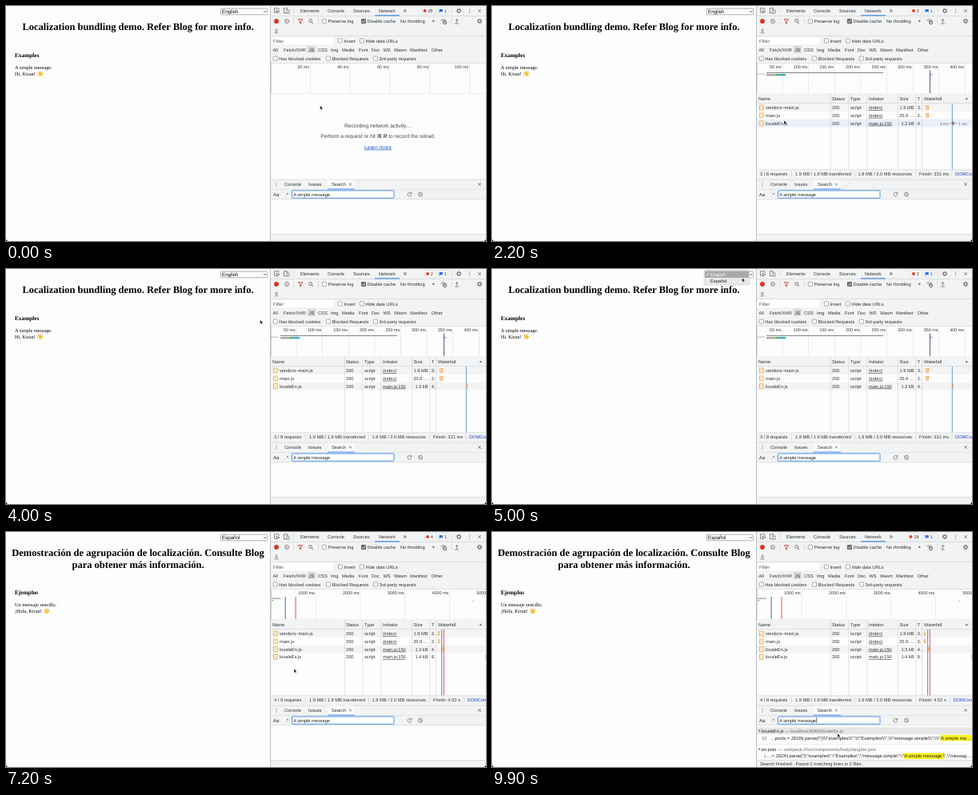
An HTML page that plays this animation: 600x294 px, repeating every 10 s.

```html
<!DOCTYPE html>
<html lang="en">
<head>
<meta charset="utf-8">
<title>Localization bundling demo</title>
<style>
html, body { margin: 0; width: 100%; height: 100%; overflow: hidden; background: #fdfdfd; }
svg { display: block; width: 600px; height: 294px; text-rendering: geometricPrecision;
  font-family: "Liberation Sans", "DejaVu Sans", sans-serif; }
.serif { font-family: "Liberation Serif", serif; }
</style>
</head>
<body>
<svg id="stage" viewBox="0 0 600 294"></svg>
<script>
const stage = document.getElementById('stage');
const BAR = '#f1f3f4', EDGE = '#cdd0d4', INK = '#333', GREY = '#6e6e6e', BLUE = '#1a73e8', ORANGE = '#f2a33a';

// drawing helpers, each returns markup
const text = (x, y, s, size = 5.7, fill = INK, more = '') =>
  `<text x="${x}" y="${y}" font-size="${size}" fill="${fill}" ${more}>${s}</text>`;
const END = 'text-anchor="end"', MID = 'text-anchor="middle"';
const rect = (x, y, w, h, fill, more = '') =>
  `<rect x="${x}" y="${y}" width="${w}" height="${h}" fill="${fill}" ${more}/>`;
const hline = (y, x = 331, w = 269, fill = EDGE) => rect(x, y, w, .6, fill);
const vline = (x, y, h, fill = EDGE, w = .6) => rect(x, y, w, h, fill);
const path = (d, stroke = GREY, w = .8, fill = 'none') =>
  `<path d="${d}" stroke="${stroke}" stroke-width="${w}" fill="${fill}"/>`;
const dot = (x, y, r, fill, more = '') => `<circle cx="${x}" cy="${y}" r="${r}" fill="${fill}" ${more}/>`;
const ring = (x, y, r, w = .8, color = GREY) => dot(x, y, r, 'none', `stroke="${color}" stroke-width="${w}"`);
const cross = (x, y, r = 1.8) => path(`M${x - r} ${y - r}l${2 * r} ${2 * r}m0 ${-2 * r}l${-2 * r} ${2 * r}`);
const dots = (x, y) => [-2, 0, 2].map(d => dot(x, y + d, .6, GREY)).join('');
const gear = (x, y) => ring(x, y, 1.9, 1.1) +
  `<circle cx="${x}" cy="${y}" r="2.8" fill="none" stroke="${GREY}" stroke-width=".8" stroke-dasharray="1.1 1.1"/>`;
const ban = (x, y) => ring(x, y, 2.5) + path(`M${x - 1.7} ${y - 1.7}l3.4 3.4`);
const box = (x, y, label) => rect(x + .3, y - 2.6, 5.2, 5.2, '#fff', 'rx="1" stroke="#777" stroke-width=".6"') +
  text(x + 7.4, y + 2.1, label);

// cursor stops: time, x, y
const stops = [
  [0, 392.5, 124.5], [1400, 392.5, 124.5], [1900, 365, 143], [2300, 365, 143], [2900, 36, 78],
  [3300, 28, 88], [4000, 317.5, 63.5], [4500, 316, 6], [4700, 316, 6], [5000, 312.5, 11], [5200, 302, 15],
  [5500, 302, 15], [6200, 366, 153], [6400, 366, 153], [6800, 362, 126], [7200, 360, 171], [7400, 398, 230],
  [7700, 412, 235], [8500, 412, 235], [9200, 540, 278], [9500, 540, 278], [9800, 432, 252]
];
function pointer(t) {
  const i = stops.findIndex(s => s[0] > t);
  if (i < 0) return stops[stops.length - 1].slice(1);
  const [t0, x0, y0] = stops[i - 1], [t1, x1, y1] = stops[i];
  const k = (t - t0) / (t1 - t0), e = k * k * (3 - 2 * k);
  return [x0 + (x1 - x0) * e, y0 + (y1 - y0) * e];
}

function wave(x, y) {
  return `<g transform="translate(${x} ${y}) rotate(-25)">` +
    path('M-1.8-.5V-2.6M-.5-.8V-3.4M.8-.8V-3.2M2-.2V-2.3', '#f8c33c', 1) +
    rect(-2.3, -1.2, 4.8, 4.2, '#f8c33c', 'rx="1.8"') + path('M2 2L3.6 .2', '#efb02f', 1) + '</g>' +
    path(`M${x - 3.6} ${y + 1}q.2 1.6 1.4 2.2M${x + 2} ${y - 3.6}q1.2 .3 1.6 1.4`, '#7fb4d8', .5);
}

function page(es) {
  const dy = es ? 14.4 : 0;
  const title = es
    ? ['Demostración de agrupación de localización. Consulte Blog', 'para obtener más información.']
    : ['Localization bundling demo. Refer Blog for more info.'];
  return '<g class="serif">' +
    title.map((s, i) => text(165, 30.3 + i * 14.4, s, 12.5, '#000', MID + ' font-weight="700"')).join('') +
    text(11, 63.7 + dy, es ? 'Ejemplos' : 'Examples', 7.3, '#000', 'font-weight="700"') +
    text(11, 78.7 + dy, es ? 'Un mensaje sencillo.' : 'A simple message.', 6.25, '#000') +
    text(11, 86.9 + dy, es ? '¡Hola, Kiran!' : 'Hi, Kiran!', 6.25, '#000') + '</g>' +
    wave(es ? 50.5 : 42.7, 84.7 + dy);
}

function picker(es, open, y) {
  let s = rect(268.3, 3.2, 58.4, 7.6, '#fff', 'rx="1" stroke="#777" stroke-width=".6"') +
    text(270, 9.1, es ? 'Español' : 'English', 6.2, '#000') + path('M322.3 6.2l1.4 1.5 1.4-1.5', '#222', .8);
  if (open) {
    const on = y > 11.5 ? 1 : 0, ink = i => i === on ? '#fff' : '#222';
    s += rect(265, 1.2, 57, 18.8, '#e9e9e9', 'rx="2" stroke="#c4c4c4" stroke-width=".5"') +
      rect(266, 2.6 + on * 8.3, 55, 8.3, '#a9a9a9', 'rx="1"') +
      path('M268 6.8l1.2 1.5 1.9-3.4', ink(0), .7) +
      text(273, 9.1, 'English', 5.7, ink(0)) + text(273, 17.3, 'Español', 5.7, ink(1));
  }
  return s;
}

function toolbar(errors) {
  const wide = errors > 9;
  const types = [[333.5, 'All'], [347, 'Fetch/XHR'], [378.7, 'JS'], [390, 'CSS'], [406, 'Img'], [420, 'Media'],
    [441, 'Font'], [457, 'Doc'], [471.5, 'WS'], [485, 'Wasm'], [505, 'Manifest'], [531.5, 'Other']];
  const tabs = [[368, 'Elements'], [402, 'Console'], [434, 'Sources'], [466, 'Network']];
  const chipX = wide ? 520 : 523.5;
  return rect(331, 0, 269, 71, BAR) + hline(12) + hline(37.2) + rect(461, 11.4, 31, 1, BLUE) +
    path('M339 8.3h-3.5v-5.5h5.5v2M338 5l1 4 1-1.5 2-.5z') +
    rect(347.5, 2.8, 4, 6, 'none', `stroke="${GREY}" stroke-width=".8"`) + rect(351, 5, 3, 4, BAR, `stroke="${GREY}" stroke-width=".7"`) +
    vline(359, 2, 8) + tabs.map(([x, s]) => text(x, 8.1, s)).join('') + text(496.5, 8.2, '»', 8) +
    rect(chipX, 2, 537 - chipX, 8.2, '#fafafa', `rx="1" stroke="${EDGE}" stroke-width=".5"`) +
    dot(chipX + 3.5, 6.1, 2, '#db3b30') + text(chipX + 7.2, 8.1, errors) +
    rect(540, 2, 12.5, 8.2, '#fafafa', `rx="1" stroke="${EDGE}" stroke-width=".5"`) +
    path('M541.6 4h4.2v3.3h-2.8l-1.4 1.4z', 'none', 0, BLUE) + text(547.7, 8.1, '1') +
    vline(557, 2, 8) + gear(566, 6) + dots(579.5, 6) + cross(592, 6) +
    dot(338, 19, 2.9, '#d93025') + ban(351, 19) + vline(359.5, 15, 8) +
    path('M365.3 16.6h5.4l-2.1 2.6v2.6h-1.2v-2.6z', '#d93025', .8) +
    ring(380.6, 18.4, 1.9, .9) + path('M382 20l2 2', GREY, 1) + vline(390.5, 15, 8) +
    box(395, 19, 'Preserve log') + box(444, 19, 'Disable cache') +
    rect(444, 16.1, 6, 5.8, '#6b6b6b', 'rx="1"') + path('M445.4 19l1.3 1.5 2.2-3', '#fff', .8) +
    text(493, 21.1, 'No throttling') + path('M532.6 18h3.4l-1.7 2.4z', 'none', 0, GREY) +
    path('M543.4 17.8q3.2-2.6 6.4 0M544.8 19.3q1.8-1.4 3.6 0') + gear(548.6, 20.8).replaceAll('r="2.8"', 'r="1.6"') +
    vline(556.5, 15, 8) + path('M563.5 21v-4.6m-1.8 1.8l1.8-1.8 1.8 1.8M561 22h5') + gear(592, 19) +
    path('M338 28v4m-1.8-1.6l1.8 1.8 1.8-1.8M335.5 33.7h5') +
    rect(331.5, 38.5, 77.5, 9.7, '#fff') + text(334, 45.7, 'Filter', 5.9, '#555') +
    box(415, 43.4, 'Invert') + box(442, 43.4, 'Hide data URLs') +
    rect(376.8, 50, 10, 8.8, '#d4d6d9', 'rx="1"') + types.map(([x, s]) => text(x, 56.7, s)).join('') +
    box(333.8, 65.6, 'Has blocked cookies') + box(400, 65.6, 'Blocked Requests') + box(459, 65.6, '3rd-party requests');
}

function overview(mode) {
  const [first, gap, unit] = [[380, 49.8, 20], [362.8, 32.6, 50], [386.8, 55.8, 1000]][mode];
  let s = rect(331, 71, 269, 38, '#fdfdfd') + hline(71);
  for (let x = first, n = 1; x < 620; x += gap, n++)
    s += vline(x, 72, 37, '#dedede') + text(x - 1, 78.2, n * unit + ' ms', 5.4, INK, END);
  s += vline(330.7, 71, 38, '#777', .6);
  if (mode === 1)
    s += hline(84.8, 331, 10, '#888') + rect(343, 82.9, 146, 1.1, '#8a8a8a') + rect(343, 85, 13, 2.4, '#a8a8a8') +
      rect(355, 84.9, 5, 2.4, '#52b36a') + rect(360, 84.9, 7, 2.4, '#43a7c4') +
      vline(547, 80.5, 28.5, '#45506e', .9) + rect(548, 85.2, 2.5, 1.2, '#6da9c9');
  if (mode === 2)
    s += rect(332, 82.6, 11, 1, '#8a8a8a') + rect(332, 85, 2, 1.2, '#52b36a') +
      vline(348.7, 81, 28, '#37568f', .9) + vline(361.6, 81, 28, '#cf4a42', .9) + rect(583.5, 85.5, 1.4, 1.1, '#7fb0d8');
  return s + hline(109);
}

function idle() {
  return rect(331, 109.6, 269, 107, '#fdfdfd') +
    text(465, 152, 'Recording network activity…', 6.65, '#444', MID) +
    text(465, 165, 'Perform a request or hit <tspan font-weight="700">⌘ R</tspan> to record the reload.', 6.55, '#444', MID) +
    text(465, 178.6, 'Learn more', 6.65, '#1558d6', MID + ' text-decoration="underline"');
}

function table(es, x, y) {
  const cols = [[333, 'Name'], [425, 'Status'], [448, 'Type'], [471, 'Initiator'], [509.5, 'Size'], [531.7, 'T'], [540, 'Waterfall']];
  const rows = [['vendors~main.js', '(index)', '1.9 MB', '3.'], ['main.js', '(index)', '25.9 …', '2.'],
    ['localeEn.js', 'main.js:150', '1.3 kB', '4.'], ['localeEs.js', 'main.js:150', '1.4 kB', '8.']];
  const hover = x > 331 && y > 122 ? Math.floor((y - 122) / 9.8) : -1;
  let s = rect(331, 109.6, 269, 95, '#fdfdfd') + rect(331, 109.6, 269, 12, BAR) + hline(121.4);
  const list = rows.slice(0, es ? 4 : 3);
  list.forEach((r, i) => {
    const top = 122 + i * 9.8;
    if (hover === i || i % 2 === 0) s += rect(331, top, 269, 9.8, hover === i ? '#e9f0fb' : '#f4f4f4');
  });
  for (const cx of [423, 445.6, 468.6, 507.4, 529.6, 537.3]) s += vline(cx, 110, 95);
  s += cols.map(([cx, name]) => text(cx, 117.7, name)).join('') + path('M591.6 117l1.7-2.6 1.7 2.6z', 'none', 0, GREY);
  const marks = es ? [[544.2, '#4a7fd0'], [546.8, '#d2443c']] : [[574.8, '#4a8fdb']];
  s += marks.map(([mx, c]) => vline(mx, 122, 83, c, .9)).join('');
  list.forEach(([name, from, size, time], i) => {
    const top = 122 + i * 9.8, base = top + 7;
    s += rect(334.6, top + 2.2, 4.6, 5.6, '#fff6e4', `stroke="${ORANGE}" stroke-width=".8"`) +
      path(`M335.8 ${top + 5.6}l1-1.2 1 1.2`, ORANGE, .7) +
      text(342, base, name) + text(425, base, '200') + text(448, base, 'script') +
      text(471, base, from, 5.6, INK, 'text-decoration="underline"') + text(527.5, base, size, 5.7, INK, END) +
      text(531.8, base, time);
    const bar = es ? [540, 540, 545, 599][i] : [542, 542, 575.6][i], w = es ? 1.8 : i < 2 ? 4 : 1.6;
    s += rect(bar, top + 2, w, 5.8, '#f6b26b');
    if (!es && i < 2) s += rect(bar + 1.2, top + 2.6, 1, 4.6, '#fdf1e0');
    if (hover === i && !es && i === 2)
      s += text(570.5, base, '3 ms', 5, GREY, END) + hline(top + 5, 571.5, 10, '#777') +
        rect(575, top + 3.4, 2.4, 3.4, '#9a6a50') + text(583, base, '1 ms', 5, GREY);
    if (hover === i && i === 3) s += text(594.5, base, '6 ms', 5, GREY, END) + hline(top + 5, 595.5, 4.5, '#777');
  });
  const facts = [[335, es ? '4 / 9 requests' : '3 / 8 requests'], [379, '1.9 MB / 1.9 MB transferred'],
    [457.6, '1.9 MB / 2.0 MB resources'], [534, es ? 'Finish: 4.52 s' : 'Finish: 331 ms']];
  return s + rect(331, 204.6, 269, 12.4, BAR) + hline(204.6) + facts.map(([fx, f]) => text(fx, 212.2, f)).join('') +
    [374, 453, 529.5, es ? 572.5 : 574.5].map(fx => vline(fx, 206.5, 8)).join('') +
    text(es ? 576.5 : 579, 212.2, 'DOMContentLoaded', 5.7, '#1a3fc4');
}

function results(x, y) {
  const raw = String.raw;
  const long = raw`…ports = JSON.parse(\"{\\\"examples\\\":\\\"Examples\\\",\\\"message.simple\\\":\\\"`;
  const short = raw`…= JSON.parse("{\"examples\":\"Examples\",\"message.simple\":\"`;
  const tops = [244.4, 253.2, 267.4, 276];
  const hover = tops.findIndex(top => y >= top && y < top + 8.8);
  const head = (i, name, gap, place) => path(`M332.8 ${tops[i] + 3.4}h3l-1.5 2.4z`, 'none', 0, GREY) +
    text(337, tops[i] + 6.5, name, 5.7, '#222') + text(gap, tops[i] + 6.5, '— ' + place, 5.7, GREY);
  return (hover >= 0 ? rect(331, tops[hover], 269, 8.7, '#e6e6e6') : '') +
    head(0, 'localeEn.js', 366, 'localhost:8080/localeEn.js') + text(343.5, 259.7, '10', 5.7, GREY, END) +
    rect(560.6, 253.8, 39.4, 7.6, '#fdf31c') + text(560.6, 259.7, long, 5.88, '#222', END) +
    text(561, 259.7, 'A simple me…', 5.88, '#222') + hline(265.3, 331, 269, '#e2e2e2') +
    head(2, 'en.json', 358, 'webpack:///src/components/body/lang/en.json') + text(343, 282.4, '1', 5.7, GREY, END) +
    rect(515, 276.5, 50.3, 7.6, '#fdf31c') + text(515, 282.4, short, 5.82, '#222', END) +
    text(515.2, 282.4, raw`A simple message.\",\"messag…`, 5.82, '#222') +
    rect(331, 285, 269, 9, BAR) + hline(285) +
    text(335, 291.6, 'Search finished. &#160;Found 2 matching lines in 2 files.', 5.75);
}

function drawer(t, x, y) {
  const caret = (t >= 1300 && t < 2800 && (t - 1300) % 1000 < 500) || (t >= 7700 && (t - 7700) % 1000 < 500);
  return rect(331, 217, 269, 77, '#fdfdfd') + rect(331, 217, 269, 12.3, BAR) + hline(216.8) + hline(229.2) +
    dots(338, 223) + text(348, 225.1, 'Console') + text(378, 225.1, 'Issues') +
    rect(402, 217.5, 34, 11.8, '#fafafa') + rect(402, 228.6, 34, .9, BLUE) +
    text(407, 225.1, 'Search') + cross(430.5, 223, 1.4) + cross(592, 223) +
    rect(331, 229.8, 269, 12, BAR) + hline(241.6) + text(334, 237.8, 'Aa', 6) + text(349, 238, '.*', 6) +
    rect(357.5, 230.9, 127.5, 9.4, '#fff', 'rx=".6" stroke="#4d90e8" stroke-width="1"') +
    text(359.2, 237.7, 'A simple message', 5.65, '#222') + (caret ? vline(405, 232, 7, '#222') : '') +
    path('M506.3 234.2a2.4 2.4 0 1 0 .5 2M506.9 232.8v2h-2') + ban(518, 235.7) +
    rect(331, 285, 269, 9, BAR) + hline(285) + (t >= 8500 ? results(x, y) : '');
}

function cursor(x, y) {
  if (x > 358 && x < 485 && y > 231 && y < 240)
    return path(`M${x - 1} ${y - 3}l1 .5 1-.5m-1 .5v5m-1 .5l1-.5 1 .5`, '#222', .6);
  return `<g transform="translate(${x} ${y})">` +
    path('M0 0V5.2L1.2 4.1 2.1 6 3 5.6 2.2 3.7H3.8Z', '#fff', .5, '#000') + '</g>';
}

function draw(t) {
  const [x, y] = pointer(t);
  const es = t >= 5500, loaded = t >= 1200, blank = t >= 1000 && t < 1200;
  const errors = t < 1000 ? 28 : t < 5500 ? 2 : t < 7500 ? 4 : t < 8000 ? 17 : 18;
  stage.innerHTML = rect(0, 0, 600, 294, '#fdfdfd') +
    (blank ? '' : page(es) + picker(es, t >= 4600 && t < 5400, y)) +
    toolbar(errors) + overview(es ? 2 : loaded ? 1 : 0) + (loaded ? table(es, x, y) : idle()) +
    drawer(t, x, y) + vline(330, 0, 294, '#b5b8bc', .9) +
    path('M0 291q.2 2.7 3 3H0zM600 291q-.2 2.7-3 3h3z', 'none', 0, '#000') + cursor(x, y);
}

let shown = -1;
function tick() {
  const t = Math.floor(performance.now() % 10000 / 100) * 100;
  if (t !== shown) draw(shown = t);
  requestAnimationFrame(tick);
}
tick();
</script>
</body>
</html>
```
